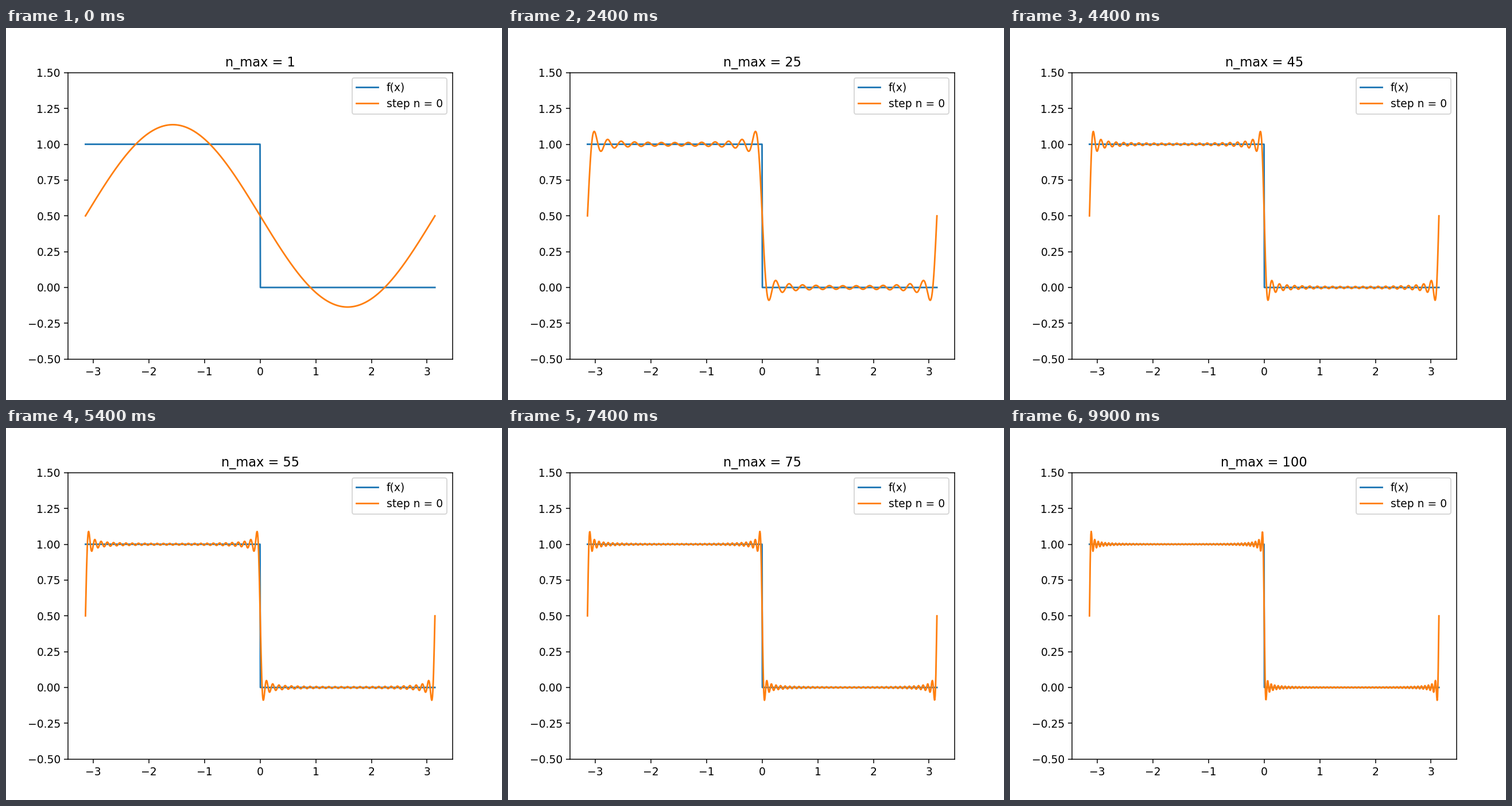
These frames come from a looping animation (864 by 648 pixels, 10 s). A matplotlib script:

```python
import matplotlib.pyplot as plt
import numpy as np
from matplotlib.animation import FuncAnimation

FRAMES = 100

x = np.linspace(-np.pi, np.pi, 1000)


def partial_sum(n_max):
    """Fourier series of the step, truncated at n_max (even terms vanish)."""
    n = np.arange(1, n_max + 1, 2)[:, None]
    return 0.5 - 2 / np.pi * (np.sin(n * x) / n).sum(axis=0)


fig, ax = plt.subplots(figsize=(6.4, 4.8), dpi=135)
ax.plot(x, np.where(x < 0, 1.0, 0.0), label="f(x)")
series, = ax.plot(x, partial_sum(1), label="step n = 0")
ax.set_ylim(-0.5, 1.5)
ax.legend(loc="upper right")
title = ax.set_title("n_max = 1")


def update(i):
    n_max = i + 1
    series.set_ydata(partial_sum(n_max))
    title.set_text(f"n_max = {n_max}")
    return series, title


anim = FuncAnimation(fig, update, frames=FRAMES, interval=100,
                     repeat=True, repeat_delay=0, blit=False)
plt.show()
```
